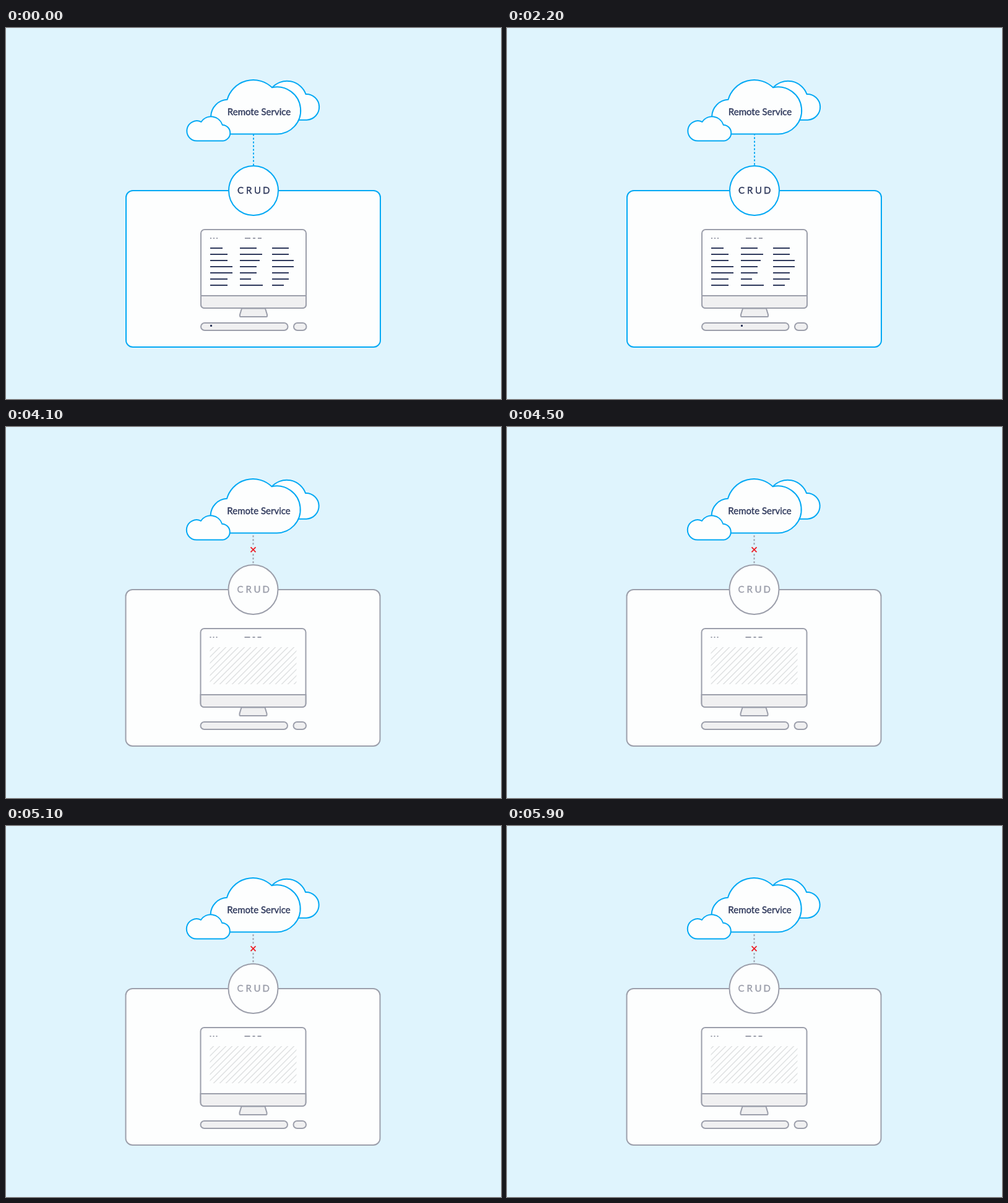
These frames come from a looping animation (800 by 600 pixels, 6 s). An HTML page:

```html
<!DOCTYPE html>
<html lang="en">
<head>
<meta charset="utf-8">
<title>Remote Service</title>
<style>
  html, body { margin: 0; width: 100%; height: 100%; overflow: hidden; background: #dff4fd; }
  svg { display: block; width: 800px; height: 600px; --main: #03a9f4; --ink: #2f395c; --grey: #9c9fab; }
  .off { --main: var(--grey); }
  text { font: 400 15px Lato, "Open Sans", sans-serif; text-anchor: middle; stroke-width: .4; }
  .sky, .app, .pc { fill: #fdfefe; stroke-width: 2; }
  .sky { stroke: #03a9f4; }
  .app, #link { stroke: var(--main); }
  .pc { stroke: var(--grey); }
  .base { fill: #f0f0f1; }
  #link { stroke-width: 2; stroke-dasharray: 3 3; fill: none; }
  #rows { stroke: var(--ink); stroke-width: 2; }
  #hatch { stroke: #dfe1e2; stroke-width: 1.5; fill: none; }
  #label { fill: var(--ink); stroke: var(--ink); }
  .off #label { fill: var(--grey); stroke: var(--grey); }
</style>
</head>
<body>
<svg viewBox="0 0 800 600">
  <defs><clipPath id="screen"><rect x="330" y="356" width="140" height="60"/></clipPath></defs>
  <rect width="800" height="600" fill="#dff4fd"/>
  <g id="scene">
    <g class="sky">
      <path d="M430 96.5A32.4 32.4 0 0 1 484.5 106.9A20.9 20.9 0 0 1 486 148.7H445Z"/>
      <path d="M356 171.4A27.9 27.9 0 0 1 357.5 115.8A43.8 43.8 0 0 1 430 96.3A38 38 0 1 1 437.5 171.4Z"/>
      <path d="M308.5 182.6A16.2 16.2 0 1 1 315.5 151.8A19.3 19.3 0 0 1 349.8 156.7A13 13 0 0 1 350.8 182.6Z"/>
    </g>
    <text x="409" y="141" fill="#2f395c" stroke="#2f395c">Remote Service</text>
    <path id="link"/>
    <g class="app">
      <rect x="194" y="263" width="411" height="253" rx="11"/>
      <circle cx="400" cy="263" r="40"/>
    </g>
    <text id="label" x="379 392.7 406.5 420.8" y="268">CRUD</text>
    <g class="pc">
      <rect x="315" y="326" width="170" height="127" rx="6"/>
      <path class="base" d="M315 433H485V447Q485 453 479 453H321Q315 453 315 447Z"/>
      <path class="base" d="M381 453.5L378 463.5V466Q378 467 379 467H421Q422 467 422 466V463.5L419 453.5Z"/>
      <rect class="base" x="315" y="477" width="140.5" height="12" rx="6"/>
      <rect class="base" x="465" y="477" width="20.5" height="12" rx="6"/>
      <path d="M330 340h2m3 0h2m3 0h2M386 340h9m4 0h4m4 0h6"/>
    </g>
    <g id="online">
      <path id="rows"/>
      <rect id="key" width="3" height="3" fill="#2f395c"/>
    </g>
    <g id="offline">
      <g clip-path="url(#screen)"><path id="hatch"/></g>
      <path d="M396 194.3l8 8m0-8l-8 8" stroke="#ee1c25" stroke-width="1.8"/>
    </g>
  </g>
</svg>
<script>
  const $ = id => document.getElementById(id);
  const LOOP = 6000, CUT = 4000;

  // Line lengths per column; the visible window of seven slides back as lines arrive on top.
  const columns = [
    { x: 330, len: [20, 28, 20, 28, 28, 36, 36, 28, 28] },
    { x: 378, len: [27, 36, 27, 36, 32, 27, 27, 18, 37] },
    { x: 430, len: [27, 27, 27, 27, 35, 35, 27, 27, 19] }
  ];

  // Pressed key at each step
  const keys = [[330, 480], [378, 480], [354, 483], [390, 480], [330, 480],
                [330, 480], [428, 482], [399, 483], [371, 480], [385, 482]];

  const rowsPath = first => columns.map(c =>
    c.len.slice(first, first + 7).map((w, i) => `M${c.x} ${356 + 10 * i}h${w}`).join('')
  ).join('');

  function hatchPath(shift) {
    let d = '';
    for (let x = 315; x < 540; x += 10) d += `M${x + shift + 5} 351l-70 70`;
    return d;
  }

  function setOnline(t) {
    const step = Math.floor(t / 200) % 10;
    const [x, y] = keys[step];
    $('rows').setAttribute('d', rowsPath(step < 3 ? 2 : step < 6 ? 1 : 0));
    $('key').setAttribute('x', x);
    $('key').setAttribute('y', y);
    $('link').setAttribute('d', 'M400 172V222');
    $('link').style.strokeDashoffset = 0.4 + 1.2 * (step % 5);
  }

  function setOffline(t) {
    $('hatch').setAttribute('d', hatchPath(Math.floor(t / 100) % 10));
    $('link').setAttribute('d', 'M400 175.2V191M400 205.2V222');
    $('link').style.strokeDashoffset = 0;
  }

  function draw(now) {
    const t = now % LOOP, on = t < CUT;
    $('scene').setAttribute('class', on ? '' : 'off');
    $('scene').setAttribute('transform', on ? '' : 'translate(-.5 0)');
    $('online').style.display = on ? '' : 'none';
    $('offline').style.display = on ? 'none' : '';
    if (on) setOnline(t); else setOffline(t - CUT);
  }

  let start = null;
  function tick(now) {
    if (start === null) start = now;
    draw(Math.max(0, now - start));
    requestAnimationFrame(tick);
  }
  draw(0);
  requestAnimationFrame(tick);
</script>
</body>
</html>
```
